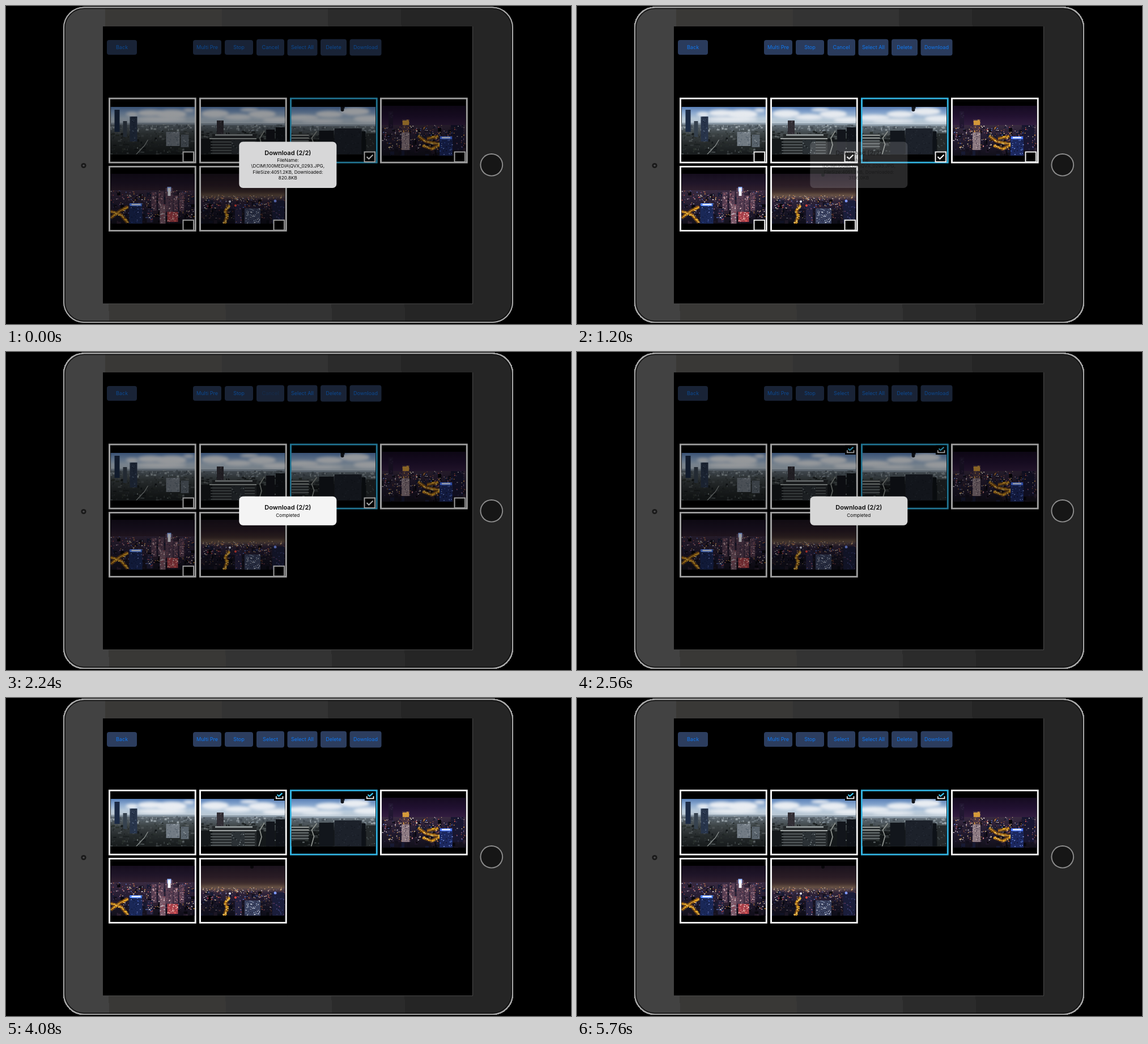
An HTML page with a canvas that plays this animation: 997 px wide and 561 px high, repeating every 6.08 s.

```html
<!DOCTYPE html>
<html lang="en">
<head>
<meta charset="utf-8">
<style>
html, body { margin: 0; width: 100%; height: 100%; overflow: hidden; background: #000; }
canvas { display: block; }
</style>
</head>
<body>
<canvas id="stage" width="997" height="561"></canvas>
<script>
const LOOP = 6080, STEP = 80;
const stage = document.getElementById('stage');
const view = stage.getContext('2d');
const backdrop = makeLayer();
const back = backdrop.getContext('2d');

function makeLayer() {
  const layer = document.createElement('canvas');
  layer.width = 997;
  layer.height = 561;
  return layer;
}

let seed = 11;
const random = () => (seed = (seed * 16807) % 2147483647) / 2147483647;
const between = (a, b) => a + (b - a) * random();
const pick = list => list[Math.floor(random() * list.length)];
const progress = (t, start, length) => Math.max(0, Math.min(1, (t - start) / length));

function box(c, x, y, w, h, color) {
  c.fillStyle = color;
  c.fillRect(x, y, w, h);
}

function round(c, x, y, w, h, r, fill, stroke, width = 1) {
  c.beginPath();
  c.roundRect(x, y, w, h, r);
  if (fill) { c.fillStyle = fill; c.fill(); }
  if (stroke) { c.strokeStyle = stroke; c.lineWidth = width; c.stroke(); }
}

function line(c, points, color, width) {
  c.beginPath();
  points.forEach(([x, y]) => c.lineTo(x, y));
  c.strokeStyle = color;
  c.lineWidth = width;
  c.stroke();
}

function label(c, text, x, y, size, color, weight = 400) {
  c.font = `${weight} ${size}px Inter, "Liberation Sans", sans-serif`;
  c.textAlign = 'center';
  c.fillStyle = color;
  c.fillText(text, x, y + size * 0.36);
}

function disc(c, x, y, r, color) {
  c.beginPath();
  c.arc(x, y, r, 0, 7);
  c.fillStyle = color;
  c.fill();
}

function gradient(c, y, h, colors) {
  const g = c.createLinearGradient(0, y, 0, y + h);
  colors.forEach((color, i) => g.addColorStop(i / (colors.length - 1), color));
  return g;
}

// ---- device ----
function drawDevice(c) {
  const body = c.createLinearGradient(0, 0, 997, -12);
  const bands = [['#424242', 0, 175], ['#393836', 175, 381], ['#333', 381, 568],
    ['#2b2b2b', 568, 697], ['#252525', 697, 997]];
  for (const [color, from, to] of bands) {
    body.addColorStop(from / 997, color);
    body.addColorStop(to / 997, color);
  }
  round(c, 102, 2.5, 792, 555.5, 36, body, '#a8a8a8', 2);
  round(c, 104, 4.5, 788, 551.5, 34, null, '#111', 1.6);
  box(c, 171, 36, 652.5, 489, '#000');
  line(c, [[823.5, 36], [823.5, 525.3], [171, 525.3]], '#4a4a4a', 1);
  disc(c, 137, 281.5, 4.6, '#191919');
  disc(c, 137, 281.5, 1.8, '#4a4a4c');
  disc(c, 856.8, 280.3, 20.3, '#8e8e8e');
  disc(c, 856.8, 280.3, 18.4, '#161616');
}

// ---- pictures ----
function photo(c, x, y, w, h, sky, skyline, paint) {
  c.save();
  c.beginPath();
  c.rect(x, y, w, h);
  c.clip();
  c.translate(x, y);
  box(c, 0, 0, w, h, gradient(c, 0, skyline, sky));
  paint(c);
  c.restore();
}

function scatter(c, count, x, y, w, h, colors, maxW, maxH) {
  for (let i = 0; i < count; i++)
    box(c, x + between(0, w), y + between(0, h), between(.8, maxW), between(.8, maxH), pick(colors));
}

function tower(c, x, y, w, h, color, windows, count = 0) {
  box(c, x, y, w, h, color);
  if (count) scatter(c, count, x, y, w - 1.5, h - 1.5, windows, 2.2, 1.6);
}

function clouds(c, spots) {
  c.save();
  c.filter = 'blur(2.5px)';
  for (const [x, y, rx, ry] of spots) {
    c.beginPath();
    c.ellipse(x, y, rx, ry, 0, 0, 7);
    c.fillStyle = '#e9edf2';
    c.fill();
  }
  c.restore();
}

const DAY_SKY = ['#587fb6', '#8caad0', '#b8cadb', '#bdc9d3'];
const DAY_TONES = ['#14181a', '#24292b', '#34393b', '#4a5052', '#1c2122', '#2b322f', '#5d6466'];
const LIGHTS = ['#e09a45', '#ffe2a6', '#a85a3a', '#d85a58', '#6684dc', '#f2e8e4', '#9a6a8a', '#3c3a62', '#51405c'];
const DARKS = ['#08070d', '#120f1c', '#1f1729', '#171a33', '#2d2031'];

function dayCity(c, cloudSpots, top) {
  clouds(c, cloudSpots);
  box(c, 0, top - 2, 150, 4, '#8c9ba8');
  box(c, 0, top + 1, 150, 80, gradient(c, top, 52, ['#66727c', '#3d4446', '#262b2c', '#181c1d']));
  scatter(c, 90, -3, top, 150, 10, ['#7e8a93', '#566069', '#434c54', '#96a0a6'], 5, 4);
  scatter(c, 200, -4, top + 11, 152, 46, DAY_TONES, 7, 4);
}

function nightCity(c, top, height) {
  box(c, 0, top, 150, height, gradient(c, top, height, ['#392a40', '#211a30', '#12101a']));
  scatter(c, 120, -3, top + 2, 150, height, DARKS, 9, 9);
  scatter(c, 280, 0, top, 148, height * .8, LIGHTS, 2.4, 1.7);
}

function road(c, points) {
  line(c, points, '#8a5410b0', 6);
  line(c, points, '#dfa02c', 1.4);
  for (let i = 1; i < points.length; i++) {
    const [[x0, y0], [x1, y1]] = [points[i - 1], points[i]];
    for (let k = 0; k < 12; k++) {
      const u = random();
      box(c, x0 + (x1 - x0) * u + between(-3, 2), y0 + (y1 - y0) * u + between(-3, 2), 2, 1.4,
        pick(['#ffc93a', '#f0a51e', '#ffe58a', '#a05c10']));
    }
  }
}

function drawPhotos(c) {
  photo(c, 184.5, 178, 148.5, 83.5, DAY_SKY, 30, c => {
    dayCity(c, [[38, 13, 11, 4], [70, 11, 22, 6], [108, 13, 26, 8], [90, 22, 44, 4], [138, 6, 10, 3]], 30);
    tower(c, 7, 5, 9, 39, '#1b2a45');
    tower(c, 34, 17, 13, 44, '#28354b', ['#51637c', '#182336'], 24);
    tower(c, 22, 25, 7, 28, '#36424f');
    tower(c, 98, 44, 24, 25, '#737c85', ['#a9b1b8', '#515d69'], 30);
    tower(c, 124, 49, 14, 22, '#5a646d', ['#8d969c', '#353d44'], 12);
    line(c, [[45, 84], [60, 68], [66, 58]], '#858b8a', 1.4);
  });
  photo(c, 344, 178, 148.5, 83.5, DAY_SKY, 31, c => {
    dayCity(c, [[25, 12, 24, 7], [65, 18, 24, 5], [108, 13, 24, 7], [135, 23, 26, 5], [85, 5, 16, 3]], 31);
    box(c, 0, 56, 148, 30, '#14181a');
    scatter(c, 40, 0, 54, 145, 30, DAY_TONES, 8, 3);
    tower(c, 28, 24, 12, 25, '#322f36', ['#57505a', '#1e2029'], 16);
    tower(c, 20, 48, 78, 36, '#25292b');
    box(c, 25, 48, 66, 3, '#8c9394');
    box(c, 15, 55, 83, 2, '#a3a8a7');
    for (let y = 61; y < 84; y += 5) box(c, 17, y, 78, 1.6, '#5d6466');
    tower(c, 54, 58, 23, 26, '#2b3135', ['#7b8588', '#151a1d'], 26);
    line(c, [[102, 84], [107, 67], [104, 55], [112, 42]], '#8a8f8b', 1.8);
    tower(c, 115, 40, 15, 44, '#12151b');
    tower(c, 132, 36, 16, 48, '#0f1218', ['#20252d'], 12);
  });
  photo(c, 503.5, 178, 148.5, 83.5, DAY_SKY, 33, c => {
    dayCity(c, [[20, 19, 28, 5], [67, 13, 24, 6], [112, 8, 26, 7], [136, 21, 26, 6], [55, 25, 36, 3]], 33);
    box(c, 0, 57, 148, 27, '#121617');
    scatter(c, 35, 0, 54, 80, 30, DAY_TONES, 7, 3);
    tower(c, 0, 48, 30, 25, '#2c3133');
    for (let y = 49; y < 73; y += 5) box(c, 0, y, 31, 1.8, y < 58 ? '#a5aaa7' : '#697072');
    line(c, [[35, 84], [40, 66], [36, 55], [45, 43]], '#8d928e', 1.8);
    tower(c, 49, 42, 26, 42, '#12161c');
    tower(c, 76, 38, 48, 46, '#1c212a', ['#282e39', '#141820'], 60);
    tower(c, 124, 43, 7, 41, '#0e1218');
    tower(c, 132, 47, 16, 37, '#24292b', ['#4d565a'], 14);
    box(c, 87, 0, 7, 3, '#11151c');
    disc(c, 90, 5, 3, '#11151c');
  });
  photo(c, 663, 176, 148.5, 88, ['#150b20', '#211131', '#351f42'], 36, c => {
    nightCity(c, 34, 54);
    tower(c, 12, 10, 8, 30, '#211731', ['#38284a'], 8);
    tower(c, 36, 24, 13, 42, '#4a3442', ['#f0b84f', '#dc8d39', '#9c7280'], 45);
    box(c, 37, 26, 11, 8, '#d59a3a');
    tower(c, 122, 34, 22, 44, '#181630', LIGHTS, 24);
    tower(c, 35, 47, 14, 31, '#8d7a82', ['#e5d4d2', '#403348'], 30);
    road(c, [[64, 53], [78, 63], [104, 68], [88, 76], [72, 70]]);
    road(c, [[80, 58], [100, 54]]);
    tower(c, 102, 55, 23, 33, '#1c2860', ['#3f66c9', '#10132a', '#8fa9f5'], 36);
    box(c, 103, 54, 21, 5, '#4a78ff');
    box(c, 106, 55, 15, 2.5, '#e8efff');
  });
  photo(c, 184.5, 296, 148.5, 88, ['#150d1d', '#1f1528', '#332130'], 32, c => {
    nightCity(c, 29, 60);
    road(c, [[0, 78], [17, 65], [31, 58]]);
    road(c, [[0, 66], [18, 72], [30, 86]]);
    tower(c, 33, 52, 23, 36, '#1a2858', ['#3c58b2', '#0d1532', '#8593d6'], 38);
    box(c, 34, 52, 21, 5, '#5288ff');
    box(c, 37, 53, 16, 2.5, '#eaf1ff');
    for (const [x, y, w, h] of [[72, 32, 9, 33], [84, 31, 10, 30], [97, 25, 13, 43], [111, 38, 8, 28], [121, 33, 9, 32]])
      tower(c, x, y, w, h, '#5a4054', ['#f0cccc', '#231a30', '#b06770', '#322640'], 30);
    box(c, 100, 23, 7, 8, '#8eb0ff');
    box(c, 101, 25, 5, 14, '#f5f7ff');
    tower(c, 87, 54, 10, 34, '#7a5a6a', ['#f0dce0', '#9c3442'], 26);
    tower(c, 100, 67, 19, 18, '#a8404a', ['#ff6860', '#ffeee6', '#ffd8cc'], 34);
    tower(c, 64, 61, 11, 25, '#23203d', LIGHTS, 22);
  });
  photo(c, 344, 296, 148.5, 88, ['#1a121c', '#2a1c25', '#4d3a34'], 40, c => {
    nightCity(c, 39, 50);
    c.save();
    c.filter = 'blur(3px)';
    box(c, 0, 36, 148, 6, '#75604e');
    c.restore();
    scatter(c, 65, 0, 37, 146, 8, ['#f5dfb4', '#d79a5b', '#87695c'], 2.2, 1.5);
    box(c, 0, 62, 148, 26, 'rgba(10,12,24,.45)');
    road(c, [[41, 88], [46, 75], [43, 66], [50, 55]]);
    tower(c, 60, 54, 12, 34, '#252342', LIGHTS, 16);
    tower(c, 77, 61, 28, 27, '#39415f', ['#a3b2d2', '#e2e4ec', '#20253e'], 64);
    tower(c, 126, 47, 21, 41, '#1a1d3a', ['#4b4f93', '#744165'], 22);
    disc(c, 131, 48, 2.4, '#7f9aff');
    disc(c, 51, 49, 2, '#f0f1ff');
    disc(c, 61, 56, 2, '#f3483e');
    disc(c, 12, 57, 1.6, '#8d3348');
    disc(c, 90, 2, 3, '#08070a');
  });
}

// ---- gallery ----
const cards = [0, 1, 2, 3, 4, 5].map(i => ({
  x: Math.round(181.4 + (i % 4) * 159.6), y: i < 4 ? 161.7 : 282, chosen: i === 1 || i === 2
}));

function drawCards(c) {
  cards.forEach(({ x, y }, i) => {
    box(c, x, y, 154.7, 115.8, i === 2 ? '#33b4e2' : '#f6f6f6');
    box(c, x + 3, y + 2.8, 148.8, 110.2, '#000');
  });
  const layer = makeLayer();
  drawPhotos(layer.getContext('2d'));
  c.filter = 'blur(.5px)';
  c.drawImage(layer, 0, 0);
  c.filter = 'none';
}

function drawCheckbox(c, { x, y, chosen }) {
  round(c, x + 131.5, y + 95.8, 18.6, 17.6, 0, '#000', '#f2f2f2', 2);
  if (chosen) line(c, [[x + 135.5, y + 104.3], [x + 139.3, y + 108], [x + 146.5, y + 100.8]], '#fff', 2.2);
}

function drawSavedMark(c, { x, y }) {
  box(c, x + 132, y + 3, 19, 16.3, '#000');
  line(c, [[x + 135.8, y + 11.5], [x + 135.8, y + 15.6], [x + 147.5, y + 15.6], [x + 147.5, y + 11.5]], '#f4f4f4', 1.8);
  line(c, [[x + 137.5, y + 8.8], [x + 140.5, y + 11.5], [x + 146.5, y + 6.2]], '#3ec5ee', 2.2);
}

// ---- toolbar ----
function drawToolbar(c, t, dim) {
  const toggle = t <= 2240 ? 'Cancel' : 'Select';
  const buttons = [['Back', 178, 53, 60, 26], ['Multi Pre', 330, 50, 60, 26], ['Stop', 386, 50, 60, 26],
    [toggle, 442, 49, 58.5, 29], ['Select All', 496.5, 53, 58.5, 29],
    ['Delete', 555, 46, 58.5, 29], ['Download', 606.5, 56, 58.5, 29]];
  c.save();
  c.globalAlpha = 1 - 0.1 * dim;
  for (const [text, x, w, y, h] of buttons) {
    round(c, x, y, w, h, 4, '#2c3d5e');
    const fading = text === toggle && t === 2240;
    label(c, text, x + w / 2, 73, 9.1, fading ? '#0f78f240' : '#0f78f2');
  }
  c.restore();
}

// ---- alerts ----
function drawAlert(c, alpha, scale, fill, height, rows) {
  if (alpha <= 0) return;
  c.save();
  c.globalAlpha = alpha;
  c.translate(497.3, 280.3);
  c.scale(scale, scale);
  round(c, -86, -height / 2, 172, height, 7, fill);
  c.globalAlpha = Math.sqrt(alpha);
  for (const [text, y, size, weight] of rows) label(c, text, 0, y, size, '#080808', weight);
  c.restore();
}

function downloadedSize(t) {
  return t < 400 ? '820.8KB' : t < 960 ? '2016.0KB' : '3136.0KB';
}

const fadeOut = (t, start) => (1 - progress(t, start, 240)) ** 1.5;
const fadeIn = (t, start) => 1 - (1 - progress(t, start, 320)) ** 2;
const popScale = (t, start) => 1 + 0.15 * (1 - progress(t, start, 340)) ** 2;

function drawAlerts(c, t) {
  if (t < 1280) drawAlert(c, fadeOut(t, 1040), 1, '#d7d7d8', 81.5, [
    ['Download (2/2)', -21.7, 11, 600],
    ['FileName:', -8.2, 8.15, 400],
    ['\\DCIM\\100MEDIA\\QVX_0293.JPG,', 2.2, 8.15, 400],
    ['FileSize:4051.2KB, Downloaded:', 12.6, 8.15, 400],
    [downloadedSize(t), 22.7, 8.15, 400]]);
  if (t >= 1920 && t < 2800) {
    const shade = Math.round(244 - 29 * progress(t, 2240, 320));
    drawAlert(c, fadeIn(t, 1920) * fadeOut(t, 2560), popScale(t, 1920), `rgb(${shade},${shade},${shade})`, 51, [
      ['Download (2/2)', -6.5, 11, 600], ['Completed', 7.5, 8.15, 400]]);
  }
  if (t >= 2560) drawAlert(c, fadeIn(t, 2560) * fadeOut(t, 3440), popScale(t, 2560), '#d7d7d8', 41, [
    ['Stored to Photos Album', -1.2, 10.5, 600]]);
}

function dimming(t) {
  if (t < 1920) return fadeOut(t, 1040) ** 2;
  return fadeIn(t, 1920) * fadeOut(t, 3440) ** 2;
}

function draw(now) {
  const t = Math.floor((now % LOOP) / STEP) * STEP;
  const dim = dimming(t);
  view.drawImage(backdrop, 0, 0);
  drawToolbar(view, t, dim);
  if (t < 2320) cards.forEach(card => drawCheckbox(view, card));
  else cards.filter(card => card.chosen).forEach(card => drawSavedMark(view, card));
  box(view, 172, 37, 651, 487, `rgba(0,0,0,${0.36 * dim})`);
  drawAlerts(view, t);
}

drawDevice(back);
drawCards(back);
const start = performance.now();
function tick() {
  draw(performance.now() - start);
  requestAnimationFrame(tick);
}
tick();
</script>
</body>
</html>
```
